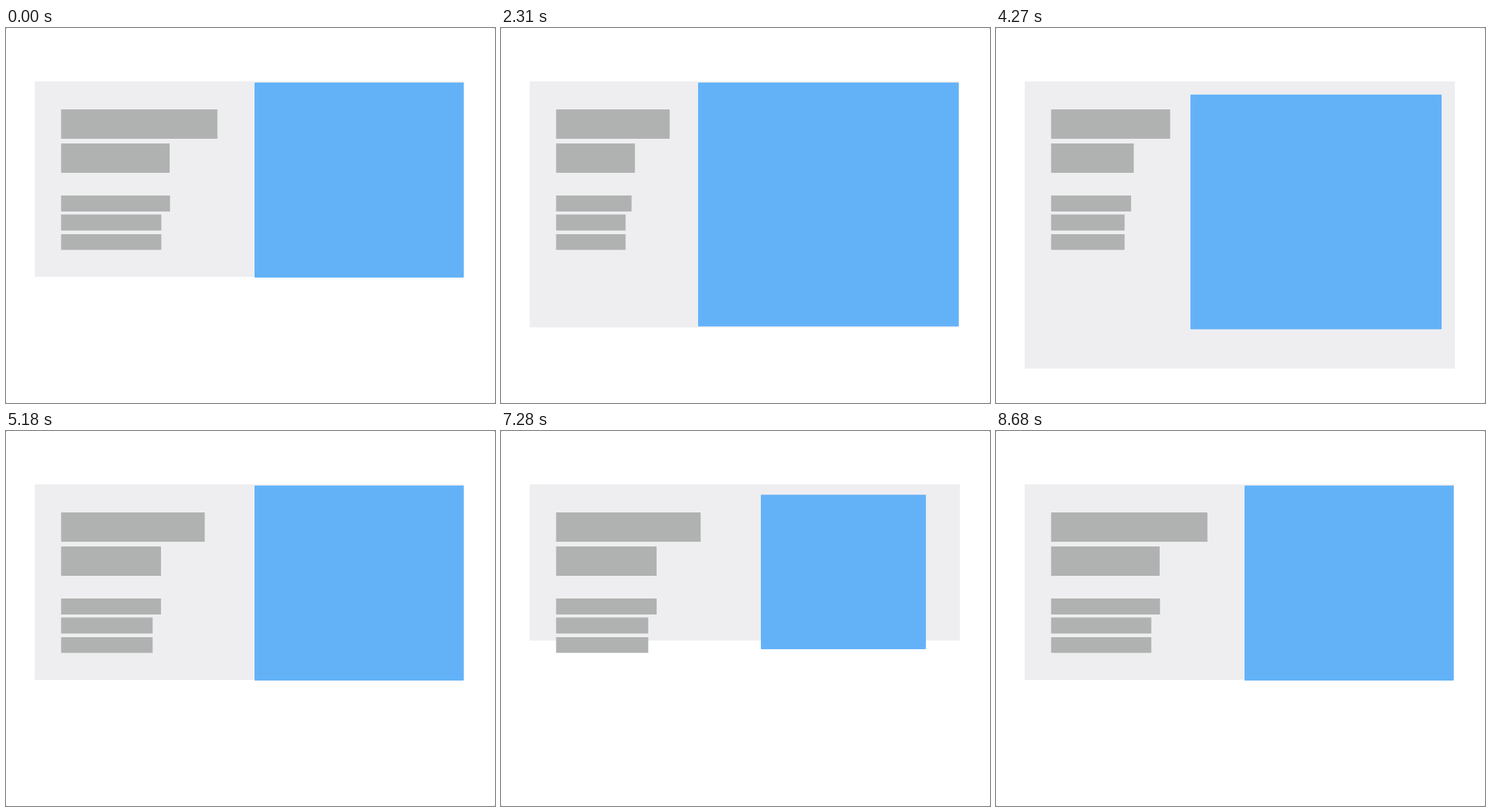
An HTML page for the animation above (8.75 s loop, 732x562 px).

```html
<!DOCTYPE html>
<html lang="en">
<head>
<meta charset="utf-8">
<title>Responsive layout</title>
<style>
  html, body { margin: 0; width: 100%; height: 100%; overflow: hidden; background: #777a7d; }
  svg { display: block; width: 100%; height: 100%; }
</style>
</head>
<body>
<svg viewBox="0 0 732 562">
  <rect width="732" height="562" rx="1.5" fill="#fff"/>
  <rect id="panel" x="43" y="80" fill="#eeeef0"/>
  <g id="bars" fill="#b0b2b1"></g>
  <rect id="tile" rx="1" fill="#63b2f8"/>
</svg>
<script>
const LOOP = 8750, MOVE = 1050, LEFT = 82.5;
const panel = document.getElementById('panel');
const tile = document.getElementById('tile');
const group = document.getElementById('bars');

const set = (el, attrs) => {
  for (const key in attrs) el.setAttribute(key, attrs[key]);
};

// Top and height of each text bar
const bars = [[122, 44], [173, 44], [251, 24], [279.5, 24], [309, 23.5]].map(([y, height]) => {
  const bar = document.createElementNS('http://www.w3.org/2000/svg', 'rect');
  set(bar, { x: LEFT, y, height });
  return group.appendChild(bar);
});

// Right edges of the bars at three column widths
const wide = [316.5, 245, 245.5, 232.5, 232.5];
const narrow = [252.5, 200.5, 195.5, 186.5, 186.5];
const medium = [297.5, 232, 232, 219.5, 219.5];

// Panel right and bottom; tile left, top, right and bottom; bar right edges
const flush = [686, 373, 372, 81.7, 685.2, 374];
const poses = [
  [...flush, ...wide],
  [686, 448.7, 295, 81.7, 685.2, 447.2, ...narrow],
  [687, 541, 273, 103.7, 663, 468.7, ...narrow],
  [...flush, ...medium],
  [687, 309.6, 390.3, 96.5, 632.3, 323.5, ...medium]
];
const starts = [845, 2548, 3896, 5465, 7007];

const ease = t => t < 0.5 ? 4 * t ** 3 : 1 - 4 * (1 - t) ** 3;

function poseAt(time) {
  const i = starts.findLastIndex(start => time >= start);
  if (i < 0) return poses[0];
  const p = ease(Math.min(1, (time - starts[i]) / MOVE));
  const next = poses[(i + 1) % poses.length];
  return poses[i].map((v, k) => v + (next[k] - v) * p);
}

function draw(time) {
  const [right, bottom, x, y, x2, y2, ...ends] = poseAt(time);
  set(panel, { width: right - 43, height: bottom - 80 });
  set(tile, { x, y, width: x2 - x, height: y2 - y });
  bars.forEach((bar, i) => set(bar, { width: ends[i] - LEFT }));
}

function tick() {
  draw(performance.now() % LOOP);
  requestAnimationFrame(tick);
}
tick();
</script>
</body>
</html>
```
